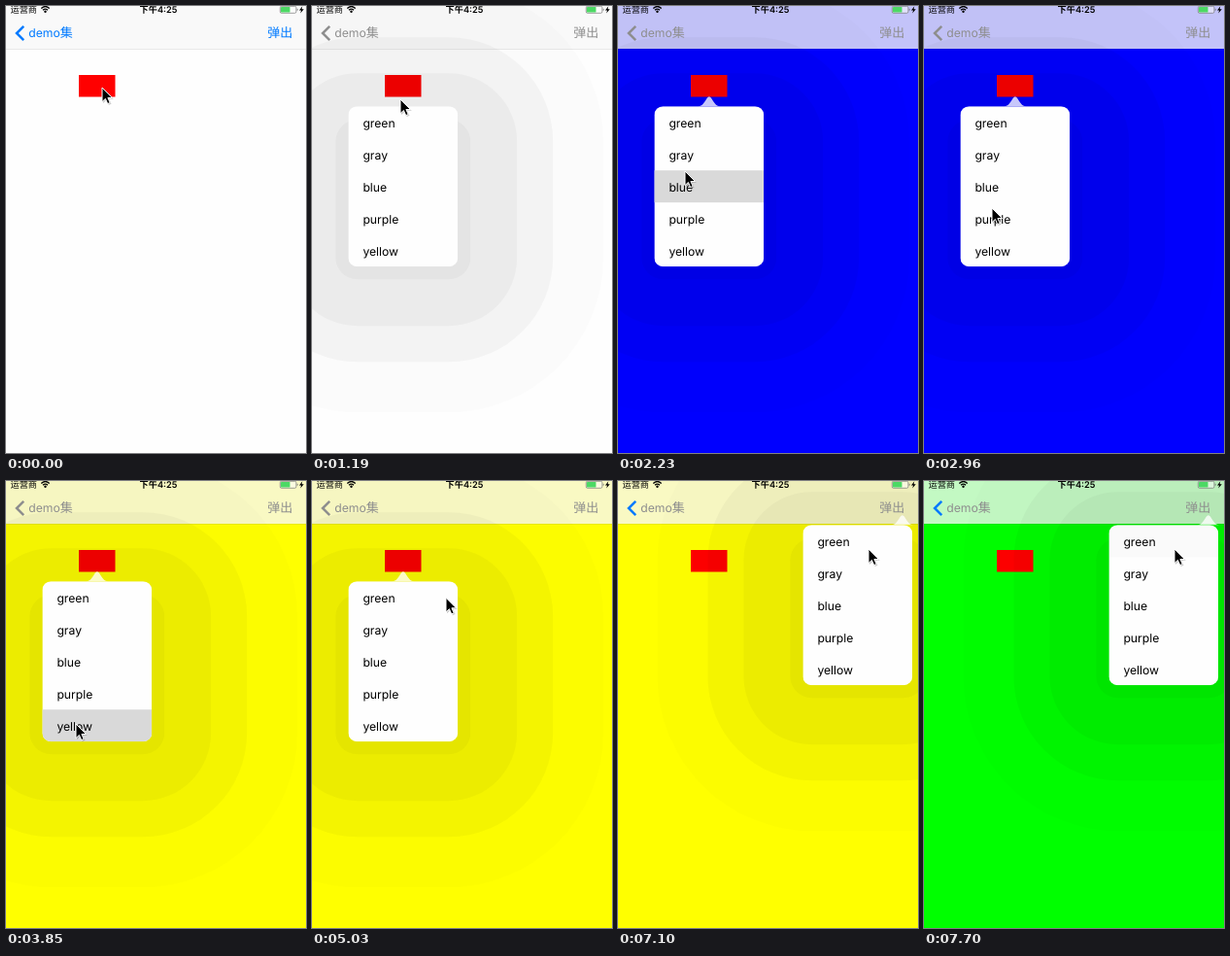
An HTML page for the animation above (8000 ms loop, 309 px wide and 460 px high).

```html
<!DOCTYPE html>
<html lang="zh">
<head>
<meta charset="utf-8">
<style>
  html, body { margin: 0; width: 100%; height: 100%; overflow: hidden; background: #fff; }
  svg { display: block; width: 100%; height: 100%; }
  text { font: 12.2px Inter, "Noto Sans CJK SC", "Noto Sans CJK", sans-serif; text-rendering: geometricPrecision; }
  .cjk { font-size: 13px; }
  .status { font-size: 9.2px; }
  .clock { font-weight: 600; text-anchor: middle; }
</style>
</head>
<body>
<svg viewBox="0 0 309 460">
  <defs><clipPath id="card"><rect width="112.8" height="165" rx="9"/></clipPath></defs>
  <rect id="page" width="309" height="460"/>
  <rect width="309" height="44" fill="#f8f8f8" opacity=".79"/>
  <rect y="44" width="309" height=".7" opacity=".12"/>
  <rect x="75" y="71" width="37.5" height="22.5" fill="#f00"/>
  <g id="shadow"></g>

  <text class="status" x="4.5" y="7.3">运营商</text>
  <path d="M36.3 2.4Q40.5-1.4 44.7 2.4M38 4.3Q40.5 2 43 4.3" fill="none" stroke="#000" stroke-width="1.3"/>
  <circle cx="40.5" cy="5.8" r="1.2"/>
  <text class="status clock" x="157" y="7.3">下午4:25</text>
  <rect x="282.3" y=".3" width="16.6" height="7" rx="1.4" fill="#fff" fill-opacity=".5" stroke="#777" stroke-width=".7"/>
  <rect x="283" y="1" width="9.5" height="5.6" rx=".6" fill="#4cd964"/>
  <path d="M299.7 2.5v2.6q1-.4 1-1.3t-1-1.3z" fill="#777"/>
  <path d="M305.3.3L302 4.4h2.1L303.2 7.5 306.8 3.2h-2.2z"/>

  <path id="chevron" d="M18.2 20.8L11 28l7.2 7.2" fill="none" stroke-width="2.5"/>
  <g id="links">
    <text x="23.3" y="32">demo<tspan class="cjk">集</tspan></text>
    <text class="cjk" x="269.3" y="32.3">弹出</text>
  </g>

  <g id="popover">
    <path id="arrow" d="M-11 0C-5 0-3-10 0-10S5 0 11 0z" fill="#fff" fill-opacity=".78"/>
    <g clip-path="url(#card)">
      <rect width="112.8" height="165" fill="#fefefe"/>
      <rect id="highlight" width="112.8" height="33" fill="#d9d9d9"/>
    </g>
    <g id="rows"></g>
  </g>
  <g id="cursor">
    <path d="M1 1.5v14.5l3.5-3.2 2.3 5.2 2.7-1.2-2.3-5h4.6z" opacity=".2"/>
    <path d="M0 0v14.6l3.4-3.2 2.3 5.2 2.5-1.1-2.3-5h4.6z" stroke="#fff" stroke-linejoin="round"/>
  </g>
</svg>
<script>
const LOOP = 8000, TICK = 147.8, ROW = 33;   // the picture advances once per TICK
const names = ['green', 'gray', 'blue', 'purple', 'yellow'];

const $ = id => document.getElementById(id);
const clamp = v => Math.max(0, Math.min(1, v));
function set(node, attrs) {
  for (const key in attrs) node.setAttribute(key, attrs[key]);
  return node;
}
const add = (parent, tag, attrs) =>
  set(parent.appendChild(document.createElementNS('http://www.w3.org/2000/svg', tag)), attrs);

names.forEach((name, i) => {
  add($('rows'), 'text', { x: 15, y: i * ROW + 21.5 }).textContent = name;
});

// The shadow falls slightly below the card, in bands of growing spread.
for (const spread of [150, 98, 61, 13]) {
  add($('shadow'), 'rect', {
    x: -spread, y: 27 - spread, width: 112.8 + 2 * spread, height: 138 + 2 * spread,
    rx: spread + 9, 'fill-opacity': spread > 100 ? .012 : .033
  });
}

// Ticks at which a row is tapped, and at which the cursor arrives somewhere.
const taps = [
  { at: 15, name: 'blue' }, { at: 21, name: 'purple' },
  { at: 26, name: 'yellow' }, { at: 50, name: 'green' }
];
const stops = [
  { at: 0, x: 99, y: 84 }, { at: 8, x: 91, y: 96 }, { at: 11, x: 80, y: 132 },
  { at: 14, x: 69, y: 170 }, { at: 20, x: 70, y: 208 }, { at: 24, x: 72, y: 250 },
  { at: 35, x: 160, y: 77 }, { at: 42, x: 277, y: 35 }, { at: 48, x: 258, y: 70 }
];

// Each trip ends on time and takes longer the farther it goes.
function cursorAt(tick) {
  const i = stops.findIndex(stop => stop.at > tick);
  if (i < 0) return stops[stops.length - 1];
  const a = stops[i - 1], b = stops[i];
  const trip = Math.ceil(Math.hypot(b.x - a.x, b.y - a.y) / 50);
  const k = clamp(1 - (b.at - tick) / trip);
  return { x: a.x + (b.x - a.x) * k, y: a.y + (b.y - a.y) * k };
}

function draw(tick) {
  const second = tick > 38;
  const shown = second ? clamp((tick - 43) / 3) : clamp(tick) * clamp((37 - tick) / 2);
  const place = { transform: `translate(${second ? '190.4 45.2' : '37.4 103.2'})`, opacity: shown };
  set($('shadow'), place);
  set($('popover'), place);
  set($('arrow'), { transform: `translate(${second ? 102.5 : 56.5})`, opacity: tick > 8 ? 1 : 0 });

  const tint = shown > .5 ? '#8e8e8e' : '#007aff';
  set($('links'), { fill: tint });
  set($('chevron'), { stroke: second ? '#007aff' : tint });

  const tap = taps.filter(tap => tap.at <= tick).pop();
  set($('page'), { fill: !tap ? '#fefefe' : tap.name === 'green' ? 'lime' : tap.name });
  set($('highlight'), {
    y: tap ? names.indexOf(tap.name) * ROW : 0,
    opacity: tap ? clamp(1 - (tick - tap.at) / 2.25) : 0
  });

  const { x, y } = cursorAt(tick);
  set($('cursor'), { transform: `translate(${x} ${y})` });
}

const start = performance.now();
function animate() {
  draw(Math.floor((performance.now() - start) % LOOP / TICK));
  requestAnimationFrame(animate);
}
animate();
</script>
</body>
</html>
```
